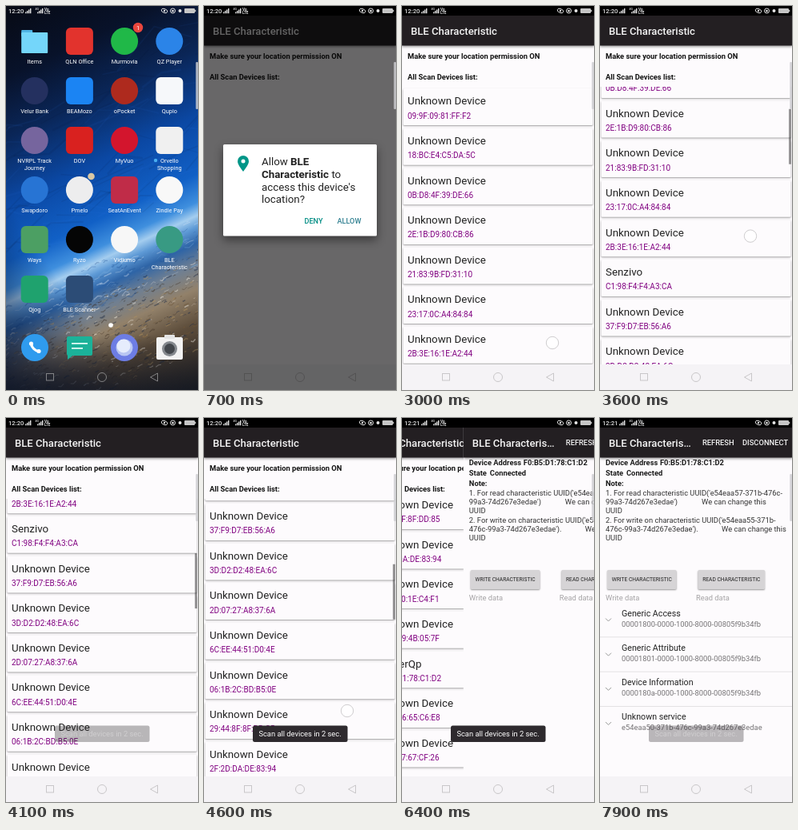
Recreate the animation shown at these times as an HTML page with a canvas. Size 240 by 480 pixels, loop 8 s.

```html
<!DOCTYPE html>
<html lang="en">
<head>
<meta charset="utf-8">
<title>BLE scan demo</title>
<style>
  html, body { margin: 0; width: 100%; height: 100%; overflow: hidden; background: #000; }
  canvas { display: block; width: 240px; height: 480px; }
</style>
</head>
<body>
<canvas id="stage"></canvas>
<script>
const W = 240, H = 480, LOOP = 8000, STEP = 100;
const canvas = document.getElementById('stage');
const ratio = window.devicePixelRatio || 1;
canvas.width = W * ratio;
canvas.height = H * ratio;
let g = canvas.getContext('2d');

const PAGE = '#fdfbfd', BAR = '#231f22', INK = '#222', PURPLE = '#800080';

// ---------- helpers ----------
function rect(x, y, w, h, color, r = 0) {
  g.fillStyle = color;
  g.beginPath();
  g.roundRect(x, y, w, h, r);
  g.fill();
}
function disc(x, y, r, color) {
  g.fillStyle = color;
  g.beginPath();
  g.arc(x, y, r, 0, 7);
  g.fill();
}
function line(points, color, width = 1, close = false) {
  g.strokeStyle = color;
  g.lineWidth = width;
  g.beginPath();
  points.forEach(([x, y]) => g.lineTo(x, y));
  if (close) g.closePath();
  g.stroke();
}
// y is the middle of the capitals
function text(s, x, y, size, color, weight = 400, align = 'left') {
  g.font = `${weight} ${size}px Roboto, sans-serif`;
  g.textAlign = align;
  g.fillStyle = color;
  g.fillText(s, x, y + size * 0.356);
  return x + g.measureText(s).width;
}
function group(paint, alpha = 1) {
  g.save();
  g.globalAlpha *= alpha;
  paint();
  g.restore();
}
function shadow(color, blur, dy) {
  g.shadowColor = color;
  g.shadowBlur = blur * ratio;
  g.shadowOffsetY = dy * ratio;
}
function track(t, keys) {
  if (t <= keys[0][0]) return keys[0][1];
  for (let i = 1; i < keys.length; i++) {
    const [t0, a] = keys[i - 1], [t1, b] = keys[i];
    if (t <= t1) return a + (b - a) * (t - t0) / (t1 - t0);
  }
  return keys[keys.length - 1][1];
}
function seeded(seed) {
  return () => (seed = (seed * 16807) % 2147483647) / 2147483647;
}

// ---------- system bars ----------
function statusBar(t, solid) {
  if (solid) rect(0, 0, W, 12, '#000');
  const c = '#e4e4e4';
  text(t < 5500 ? '12:20' : '12:21', 3, 6, 7.6, c, 500);
  for (const x of [24, 39])
    for (let i = 0; i < 4; i++) rect(x + i * 2, 7.5 - i * 1.5, 1.4, 1.8 + i * 1.5, c);
  text('4G', 36.5, 3.8, 3.5, c, 500);
  text('Vo', 48, 3.9, 4.6, c, 700);
  text('LTE', 48, 8, 4.6, c, 700);
  g.strokeStyle = c;
  g.lineWidth = 1;
  g.beginPath();
  g.ellipse(198, 6, 4, 2.4, 0.4, 0, 7);
  g.moveTo(211.5, 6);
  g.arc(208.5, 6, 3, 0, 7);
  g.stroke();
  disc(198, 6, 1.2, c);
  rect(207.3, 5, 2.4, 2.4, c);
  disc(217.5, 6, 2, c);
  rect(223, 3, 13, 6, '#c6c6c6', 1);
  rect(236, 4.7, 1.3, 2.6, '#c6c6c6');
}
function navIcons(color) {
  g.strokeStyle = color;
  g.lineWidth = 1;
  g.strokeRect(50.5, 459.5, 9, 8.5);
  g.beginPath();
  g.arc(120, 464, 5.5, 0, 7);
  g.stroke();
  line([[180.5, 464], [189.5, 459], [189.5, 469]], color, 1, true);
}
function edgeHandle() {
  rect(237.3, 70, 2.7, 59, 'rgba(205,204,208,.85)', 1);
}

// ---------- home screen ----------
function paintWallpaper() {
  const nx = 0.42, ny = 0.91, end = 536;
  const ramp = (x0, y0, x1, y1, stops) => {
    const fill = g.createLinearGradient(x0, y0, x1, y1);
    stops.forEach(([p, c]) => fill.addColorStop(p, c));
    rect(0, 0, W, H, fill);
  };
  ramp(0, 0, end * nx, end * ny, [[0, '#070a14'], [80, '#08122a'], [150, '#0a2658'],
    [225, '#0b48a4'], [290, '#1160c6'], [322, '#3f8fde'], [337, '#a4cdef'], [350, '#5e9ad6'],
    [368, '#2e64a6'], [392, '#6f7f92'], [420, '#92816a'], [460, '#5c4c3a'], [end, '#2a2622']]
    .map(([d, c]) => [d / end, c]));

  // streaks in the sky, then cloud and ridge texture on the ground
  const rnd = seeded(77);
  const streaks = (count, near, depth, size, width, alpha, tones) => {
    for (let i = 0; i < count; i++) {
      const d = near + rnd() * depth, along = rnd() * 440 - 230, len = size * (0.3 + rnd());
      const x = d * nx + along * ny, y = d * ny - along * nx, bend = (rnd() - 0.5) * len * 0.7;
      group(() => line([[x, y], [x + len * ny / 2, y - len * nx / 2 + bend], [x + len * ny, y - len * nx]],
        tones[Math.floor(rnd() * tones.length)], width * (0.4 + rnd())), alpha);
    }
  };
  streaks(90, 110, 190, 90, 2, 0.07, ['#02081c', '#2c78d8']);
  streaks(260, 338, 55, 10, 1.2, 0.35, ['#e4eef8', '#1d4f94', '#78acdc']);
  streaks(1100, 375, 115, 6, 1.1, 0.5, ['#efe9df', '#3b2e22', '#b4935f', '#6d5637', '#1c2a44']);
  ramp(0, 470, 105, 400, [[0, 'rgba(8,22,52,.8)'], [1, 'rgba(8,22,52,0)']]);
  ramp(0, 410, 0, 480, [[0, 'rgba(14,20,34,0)'], [1, 'rgba(14,20,34,.7)']]);
}
const wallpaper = document.createElement('canvas');
wallpaper.width = W;
wallpaper.height = H;
const screen = g;
g = wallpaper.getContext('2d');
paintWallpaper();
g = screen;

// label, colour, shape: o round, s square, f folder
const APPS = [
  ['Items', '#74d6fa', 'f'], ['QLN Office', '#e2332d', 's'], ['Murmovia', '#20b848', 'o'], ['QZ Player', '#2b84e8', 'o'],
  ['Velur Bank', '#24305f', 'o'], ['BEAMozo', '#1b84f3', 's'], ['oPocket', '#ae2a1e', 'o'], ['Quplo', '#f6f8fa', 's'],
  ['NVRPL Track|Journey', '#76659e', 'o'], ['DOV', '#d9211f', 's'], ['MyVuo', '#d3152d', 'o'], ['Orvello|Shopping', '#f0f0f0', 's'],
  ['Swapdoro', '#2774d4', 'o'], ['Pmelo', '#ededee', 'o'], ['SeatAnEvent', '#c02c48', 's'], ['Zindle Pay', '#f8f8f8', 'o'],
  ['Ways', '#4c9f63', 's'], ['Ryzo', '#050505', 'o'], ['Vidlumo', '#f7f7f7', 'o'], ['BLE|Characteristic', '#389a83', 'o'],
  ['Qjog', '#1fa26e', 's'], ['BLE Scanner', '#2c4c76', 's']
];
function dock() {
  disc(36, 427, 17, '#2f9bee');
  g.strokeStyle = '#fff';
  g.lineWidth = 3.4;
  g.beginPath();
  g.arc(43.5, 419.5, 12.5, 1.75, 2.96);
  g.stroke();
  disc(31.5, 422, 2.6, '#fff');
  disc(41, 431.5, 2.6, '#fff');
  rect(76, 413, 32, 24, '#1bb299', 2);
  g.beginPath();
  g.moveTo(77, 434);
  g.lineTo(77, 442);
  g.lineTo(87, 434);
  g.fill();
  rect(82, 421, 20, 1.7, '#e8fffa');
  rect(82, 427, 14, 1.7, '#e8fffa');
  disc(148, 427, 17, '#6d7de4');
  disc(148, 427, 10.5, '#b9c6f2');
  disc(147, 425, 8.5, '#e6ecfc');
  rect(188, 414, 33, 28, '#f2f2f2', 2);
  rect(198, 411, 13, 5, '#e4e4e4', 1);
  disc(204.5, 428.5, 9.5, '#85898e');
  disc(204.5, 428.5, 6.5, '#44484d');
}
function home(t) {
  g.drawImage(wallpaper, 0, 0);
  APPS.forEach(([label, color, kind], i) => {
    const x = 35.7 + (i % 4) * 56.2, y = 44 + Math.floor(i / 4) * 62;
    if (kind === 'o') disc(x, y, 17, color);
    else if (kind === 's') rect(x - 17, y - 17, 34, 34, color, 6);
    else {
      rect(x - 16.5, y - 14, 14, 8, '#4fb4e4', 1);
      rect(x - 16.5, y - 11, 33, 26, color, 1);
    }
    label.split('|').forEach((s, n) => text(s, x, y + 25 + n * 9, 7.33, '#fff', 400, 'center'));
  });
  disc(165, 27, 6.2, '#e9463d');
  text('1', 165, 27, 7.5, '#fff', 400, 'center');
  disc(106.5, 213, 4.3, '#d9c8a4');
  disc(187, 193, 2.2, '#49aef0');
  disc(131, 399, 2.8, '#fff');
  dock();
  navIcons('rgba(190,190,190,.6)');
  edgeHandle();
  statusBar(t, false);
}

// ---------- scan screen ----------
const DEVICES = [
  '09:9F:09:81:FF:F2', '18:BC:E4:C5:DA:5C', '0B:D8:4F:39:DE:66', '2E:1B:D9:80:CB:86',
  '21:83:9B:FD:31:10', '23:17:0C:A4:84:84', '2B:3E:16:1E:A2:44', 'C1:98:F4:F4:A3:CA',
  '37:F9:D7:EB:56:A6', '3D:D2:D2:48:EA:6C', '2D:07:27:A8:37:6A', '6C:EE:44:51:D0:4E',
  '06:1B:2C:BD:B5:0E', '29:44:8F:8F:DD:85', '2F:2D:DA:DE:83:94', '18:0F:60:1E:C4:F1',
  '3B:E1:F9:4B:05:7F', 'F0:B5:D1:78:C1:D2', '3D:96:36:65:C6:E8', '15:04:07:67:CF:26',
  '5A:0C:91:E7:3B:42'
];
const NAMES = { 7: 'Senzivo', 17: 'JoggerQp' };
const ROW = 49.6;
const SCROLL = [[3000, 0], [3200, 22], [3400, 72], [3600, 133.4], [3700, 190], [3800, 238],
  [4000, 305], [4200, 350], [4400, 380], [4500, 388], [4600, 393], [4700, 425], [4900, 535],
  [5000, 580], [5100, 616], [5200, 641], [5300, 654.4], [5400, 655]];

function header(title) {
  group(() => {
    shadow('rgba(0,0,0,.4)', 3, 1);
    rect(0, 12, W, 37.5, BAR);
  });
  text(title, 11, 31, 13.1, '#f4f4f4', 500);
}
function deviceRow(i, y) {
  group(() => {
    shadow('rgba(0,0,0,.38)', 2, 1);
    rect(1.5, y - 15.5, 237, 46, PAGE, 1.5);
  });
  text(NAMES[i] || 'Unknown Device', 7, y, 13.33, INK);
  text(DEVICES[i], 7, y + 18.5, 10, PURPLE);
}
function touch(x, y) {
  disc(x, y, 8, 'rgba(255,255,255,.75)');
  g.strokeStyle = '#cfcdcf';
  g.lineWidth = 1;
  g.beginPath();
  g.arc(x, y, 7.7, 0, 7);
  g.stroke();
}
function scanPage(t) {
  rect(0, 12, W, H - 12, PAGE);
  const scroll = track(t, SCROLL);
  const found = t < 2000 ? 0 : t < 2200 ? 3 : t < 2300 ? 6 : DEVICES.length;
  group(() => {
    g.beginPath();
    g.rect(0, 101, W, 347);
    g.clip();
    for (let i = 0; i < found; i++) {
      const y = 118.6 + ROW * i - scroll;
      if (y > 60 && y < 470) deviceRow(i, y);
    }
    if (t >= 3100 && t < 5500)
      group(() => rect(236, 101 + scroll * 0.208, 3, 69, 'rgba(0,0,0,.4)'), t < 5400 ? 1 : 0.5);
  });
  header('BLE Characteristic');
  text('Make sure your location permission ON', 7, 63, 9.33, '#111', 700);
  text('All Scan Devices list:', 7, 89, 9.33, '#111', 700);
  if (t >= 3000 && t <= 3600) touch(188, 421 - scroll);
  if (t >= 4500 && t <= 4900) touch(179, 759 - scroll);
  if (t >= 5900 && t <= 6000) touch(145, 314);
}

// ---------- permission dialog ----------
function dialog(t) {
  group(() => {
    shadow('rgba(0,0,0,.45)', 12, 5);
    rect(24, 173, 192, 114.5, '#fff', 1.5);
  });
  g.fillStyle = '#009688';
  g.beginPath();
  g.moveTo(49, 207);
  g.bezierCurveTo(45.5, 202, 42, 198, 42, 194);
  g.arc(49, 194, 7, Math.PI, 0);
  g.bezierCurveTo(56, 198, 52.5, 202, 49, 207);
  g.fill();
  disc(49, 194, 2.5, '#fff');
  text('BLE', text('Allow ', 72, 194.5, 13.33, INK), 194.5, 13.33, INK, 700);
  text(' to', text('Characteristic', 72, 210.2, 13.33, INK, 700), 210.2, 13.33, INK);
  text("access this device's", 72, 225.9, 13.33, INK);
  text('location?', 72, 241.6, 13.33, INK);
  if (t >= 1800) rect(161, 258, 42, 22, 'rgba(0,0,0,.12)', 1.5);
  text('DENY', 125.5, 269, 9.1, '#008d84', 500);
  text('ALLOW', 166.5, 269, 9.1, '#2f7f90', 500);
}

// ---------- detail screen ----------
const SERVICES = [
  ['Generic Access', '00001800-0000-1000-8000-00805f9b34fb'],
  ['Generic Attribute', '00001801-0000-1000-8000-00805f9b34fb'],
  ['Device Information', '0000180a-0000-1000-8000-00805f9b34fb'],
  ['Unknown service', 'e54eaa50-371b-476c-99a3-74d267e3edae']
];
function button(label, x, w) {
  group(() => {
    shadow('rgba(0,0,0,.4)', 2, 1);
    rect(x, 190, w, 24, '#d6d4d6', 1.5);
  });
  text(label, x + w / 2, 202, 6.67, INK, 400, 'center');
}
function detailPage(t) {
  rect(0, 12, W, 436, PAGE);
  header('BLE Characteris…');
  text('REFRESH', 128, 31, 9.33, '#f4f4f4', 500);
  text('DISCONNECT', 178, 31, 9.33, '#f4f4f4', 500);
  const body = (s, x, y, weight) => text(s, x, y, 9.33, weight ? '#1a1a1a' : '#333', weight);
  body('Device Address', 7, 56, 700);
  body('F0:B5:D1:78:C1:D2', 75, 56, 700);
  body('State', 7, 69, 700);
  body('Connected', 33, 69, 700);
  body('Note:', 7, 81.5, 700);
  body("1. For read characteristic UUID('e54eaa57-371b-476c-", 7, 94);
  body("99a3-74d267e3edae')", 7, 104.7);
  body('We can change this', 127, 104.7);
  body('UUID', 7, 115.5);
  body("2. For write on characteristic UUID('e54eaa55-371b-", 7, 128);
  body("476c-99a3-74d267e3edae').", 7, 139);
  body('We can change this', 152, 139);
  body('UUID', 7, 150);
  button('WRITE CHARACTERISTIC', 9, 86.5);
  button('READ CHARACTERISTIC', 122.5, 83.5);
  text('Write data', 7, 225, 9.33, '#a5a3a5');
  text('Read data', 120, 225, 9.33, '#a5a3a5');
  if (t < 7200) return;
  SERVICES.forEach(([name, id], i) => {
    const y = 244 + i * 43.2;
    text(name, 27, y, 10.67, INK);
    text(id, 27, y + 13.3, 9.33, '#757375');
    line([[7, y + 6.5], [10.5, y + 10], [14, y + 6.5]], '#999');
    if (i < 3) rect(0, y + 29.5, W, 0.8, '#dcdadc');
  });
}

// ---------- app ----------
function app(t) {
  const enter = track(t, [[6200, 1], [6300, 0.7], [6400, 0.32], [6500, 0.08], [6600, 0]]);
  if (enter > 0) group(() => {
    g.translate(-60 * (1 - enter), 0);
    scanPage(t);
  });
  if (enter < 1) group(() => {
    g.translate(W * enter, 0);
    detailPage(t);
  });
  rect(0, 448, W, 32, '#f5f3f6');
  navIcons('#c9c7c9');

  const dim = track(t, [[400, 0], [500, 0.2], [600, 0.44], [700, 0.59], [1900, 0.59],
    [2000, 0.42], [2100, 0.21], [2200, 0.08], [2300, 0]]);
  if (dim > 0) rect(0, 12, W, H - 12, `rgba(0,0,0,${dim})`);
  const shown = track(t, [[400, 0], [500, 0.3], [600, 0.75], [700, 1], [1900, 1], [2000, 0.35], [2100, 0]]);
  if (shown > 0) group(() => dialog(t), shown);
  edgeHandle();

  const toast = track(t, [[4000, 0], [4300, 1], [7500, 1], [7600, 0.9], [7900, 0.33]]);
  if (toast > 0) group(() => {
    rect(61, 384.5, 118.5, 20.5, '#2e2a2e', 2.5);
    text('Scan all devices in 2 sec.', 120, 395, 9.33, '#fff', 400, 'center');
  }, toast);
  statusBar(t, true);
}

function draw(t) {
  g.setTransform(ratio, 0, 0, ratio, 0, 0);
  if (t >= 300) return app(t);
  home(t);
  const open = track(t, [[0, 0], [100, 0.45], [200, 0.85], [300, 1]]);
  if (open > 0) group(() => {
    g.translate(204 * (1 - open), 291 * (1 - open));
    g.scale(open, open);
    app(t);
  }, open);
}
function tick() {
  const t = performance.now() % LOOP;
  draw(Math.floor(t / STEP) * STEP);
  requestAnimationFrame(tick);
}
tick();
</script>
</body>
</html>
```
